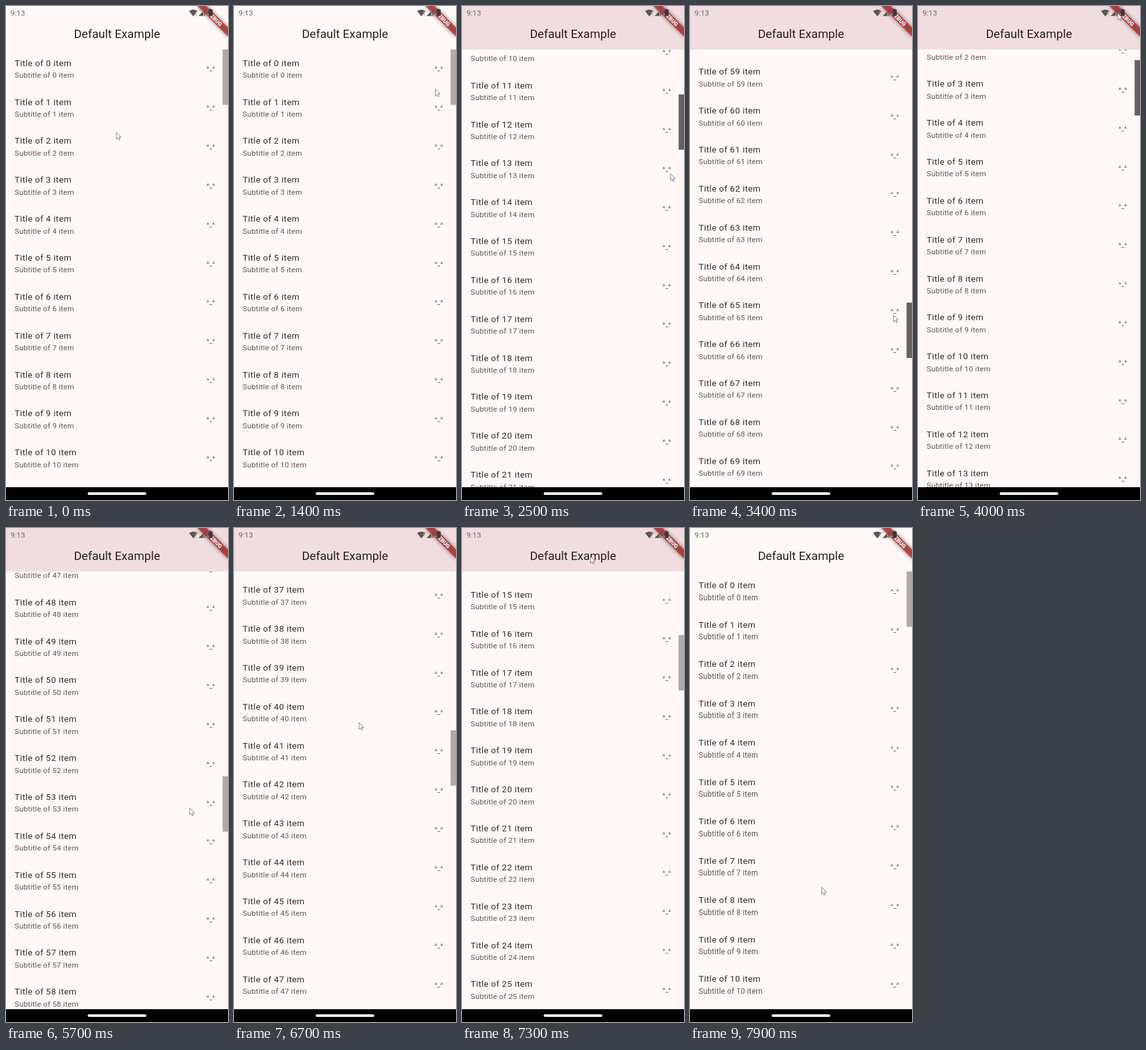
Recreate the animation shown at these times as an HTML page. Size 348 by 772 pixels, loop 8 s.

```html
<!DOCTYPE html>
<html lang="en">
<head>
<meta charset="utf-8">
<title>Scrolling list</title>
<style>
  html, body { margin: 0; width: 100%; height: 100%; overflow: hidden; background: #fff8f6; }
  svg { display: block; width: 100%; height: 100%; font-family: Roboto, Arial, sans-serif; }
  .title { font-size: 13.53px; letter-spacing: .42px; fill: #342a2a; }
  .sub { font-size: 11.84px; letter-spacing: .21px; fill: #625353; }
  .face { font-size: 9.3px; font-weight: 500; letter-spacing: .42px; fill: #625353; }
</style>
</head>
<body>
<svg viewBox="0 0 348 772">
  <defs>
    <clipPath id="view"><rect y="68" width="348" height="684"/></clipPath>
    <filter id="soft" x="-30%" y="-150%" width="160%" height="400%"><feGaussianBlur stdDeviation="3.2"/></filter>
  </defs>
  <rect width="348" height="772" fill="#fff8f6"/>
  <g clip-path="url(#view)"><g id="list"></g></g>
  <rect id="thumb" x="339.5" width="8.5" height="86.5"/>

  <rect id="bar" width="348" height="68"/>
  <text x="174" y="50" text-anchor="middle" font-size="18.6" fill="#2a2020">Default Example</text>

  <g transform="translate(348 0) rotate(45)">
    <rect x="-34" y="23.7" width="68" height="10.15" opacity=".5" filter="url(#soft)"/>
    <rect x="-34" y="23.7" width="68" height="10.15" fill="#b71c1c" fill-opacity=".63"/>
    <text y="31.8" text-anchor="middle" font-size="8.63" font-weight="900" fill="#fff">DEBUG</text>
  </g>

  <text x="7" y="15" font-size="11.84" fill="#6c6564">9:13</text>
  <g fill="#5b5554">
    <path d="M287 8Q293.7 3 300.4 8L293.7 16.2Z"/>
    <path d="M297.4 9h1.3v4h-1.3zM297.4 14h1.3v1.4h-1.3z" stroke="#fff8f6" stroke-width=".5"/>
    <path d="M302 15.5L312.3 5.2V15.5Z" fill-opacity=".45"/>
    <path d="M302 15.5L309 8.5V15.5ZM311.2 6.3L312.3 5.2V15.5H311.2Z"/>
    <path d="M319.3 4.6h2.8v1.2h1.9v9.8h-6.6v-9.8h1.9z" fill="#443838"/>
  </g>

  <rect y="752" width="348" height="20"/>
  <rect x="128" y="760" width="92" height="4" rx="2" fill="#fff"/>
  <path id="cursor" d="M0 0V10.6L2.4 8.4 4 12 5.7 11.3 4.1 7.8 7.3 7.5Z" fill="#fffafa" stroke="#6a6565" stroke-width=".8" stroke-linejoin="round"/>
</svg>
<script>
const LOOP = 8000, STEP = 100;
const TOP = 68, PITCH = 60.84, ITEMS = 100;
const THUMB_RATE = 0.1106; // thumb pixels per scrolled pixel
const GRAB = 2200, DROP = 5700, REST = 7700;
const $ = id => document.getElementById(id);

// The pointer moves straight from pose to pose; swing bows the way there up or down.
const poses = [
  { t: 800, scroll: 0, x: 173, y: 197.5 },
  { t: 1500, scroll: 0, x: 339.5, y: 118.5 },
  { t: GRAB, scroll: 0, x: 339.5, y: 118.5 },
  { t: 2500, scroll: 634.3, x: 327, y: 262 },
  { t: 3400, scroll: 3576, x: 319, y: 483, swing: 260 },
  { t: 4000, scroll: 150, x: 313, y: 11 },
  { t: 4700, scroll: 2597, x: 307, y: 348.5, swing: 260 },
  { t: DROP, scroll: 2893.3, x: 288, y: 437.5, swing: -170 },
  { t: 6700, scroll: 2243.6, x: 196, y: 304, swing: -150 },
  { t: REST, scroll: 0, x: 205, y: 480, swing: -384 },
  { t: 7900, scroll: 0, x: 206.5, y: 561.5 }
];

const clamp = u => Math.min(1, Math.max(0, u));
const mix = (a, b, u) => a + (b - a) * u;

function poseAt(t) {
  const next = poses.findIndex(p => p.t >= t);
  const b = poses.at(next), a = poses[next - 1] || b;
  const u = a === b ? 1 : clamp((t - a.t) / (b.t - a.t));
  const bow = (b.swing || 0) * Math.sin(Math.PI * u);
  const thumbBow = t < DROP ? bow : 0; // only the held thumb follows the bow
  return {
    x: mix(a.x, b.x, u),
    y: mix(a.y, b.y, u) + bow,
    scroll: mix(a.scroll, b.scroll, u) + thumbBow / THUMB_RATE
  };
}

function make(tag, attrs, parent) {
  const el = document.createElementNS("http://www.w3.org/2000/svg", tag);
  for (const name in attrs) el.setAttribute(name, attrs[name]);
  return parent.appendChild(el);
}

const rows = Array.from({ length: 13 }, () => {
  const g = make("g", {}, $("list"));
  const title = make("text", { class: "title", x: 13.5, y: 25.8 }, g);
  const sub = make("text", { class: "sub", x: 13.5, y: 44.2 }, g);
  make("text", { class: "face", x: 328, y: 33.4, "text-anchor": "end" }, g).textContent = "^_^";
  return { g, title, sub };
});

function draw(t) {
  const { x, y, scroll } = poseAt(t);
  const first = Math.floor(scroll / PITCH);
  rows.forEach(({ g, title, sub }, n) => {
    const i = first + n;
    g.setAttribute("transform", `translate(0 ${i * PITCH - scroll})`);
    g.setAttribute("visibility", i < ITEMS ? "visible" : "hidden");
    title.textContent = `Title of ${i} item`;
    sub.textContent = `Subtitle of ${i} item`;
  });
  const stretch = 1 + 0.0113 * clamp((t - REST) / 200);
  $("list").setAttribute("transform", `translate(0 ${TOP}) scale(1 ${stretch})`);
  $("bar").setAttribute("fill", scroll > 0 ? "#f1dddf" : "#fff8f6");
  $("thumb").setAttribute("y", TOP + scroll * THUMB_RATE);
  $("thumb").setAttribute("fill", t > GRAB && t < DROP ? "#666262" : "#aeaaa9");
  $("cursor").setAttribute("transform", `translate(${x} ${y})`);
}

const start = performance.now();
function tick() {
  const t = (performance.now() - start) % LOOP;
  draw(Math.floor(t / STEP) * STEP);
  requestAnimationFrame(tick);
}
tick();
</script>
</body>
</html>
```
